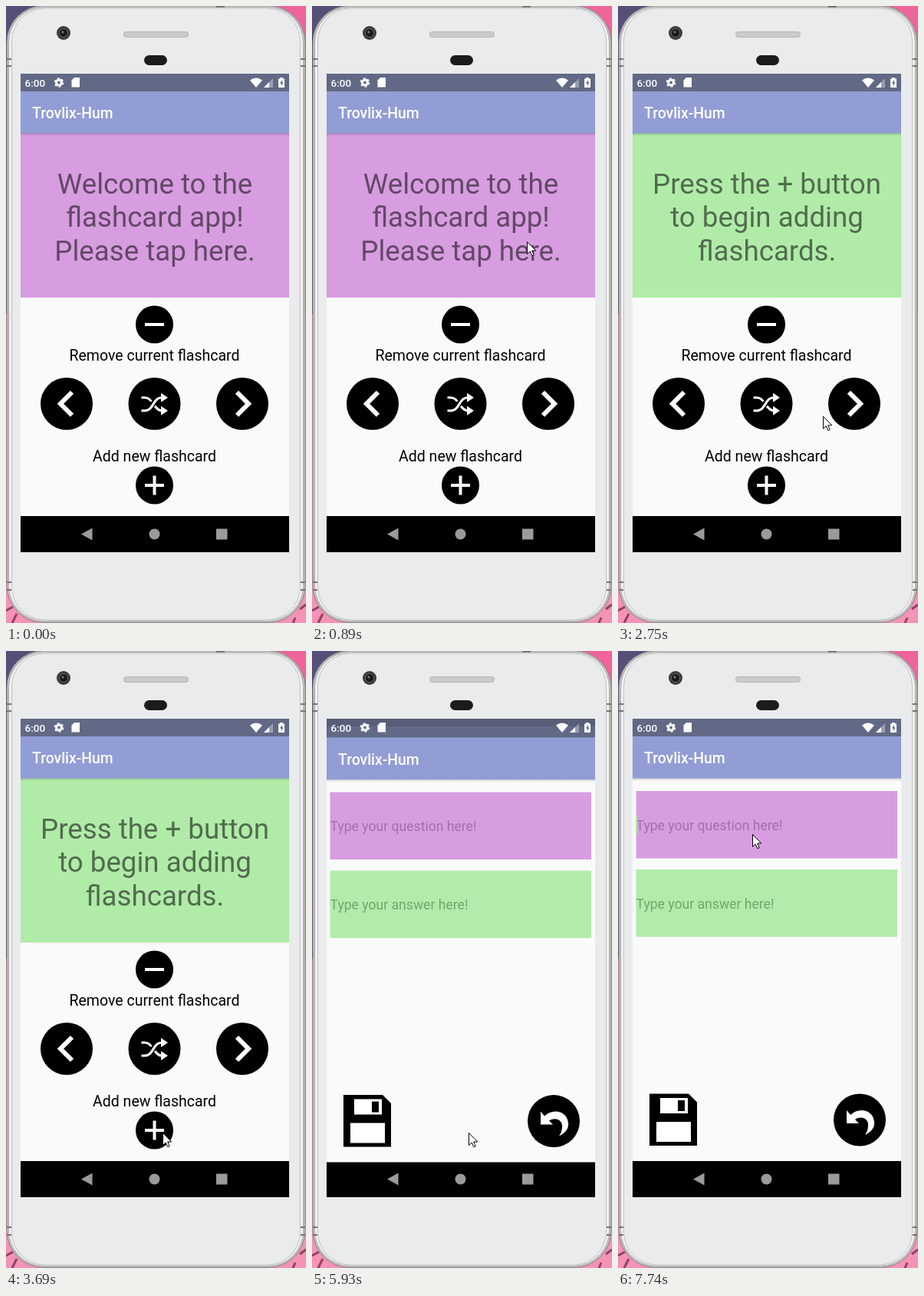
Write an HTML page that moves like this. It is 391 px wide and 802 px high and loops after 8 s.

```html
<!DOCTYPE html>
<html lang="en">
<head>
<meta charset="utf-8">
<title>Flashcards</title>
<style>
html, body { margin: 0; width: 100%; height: 100%; overflow: hidden; }
svg { display: block; width: 391px; height: 802px; font-family: Roboto, sans-serif; }
.mid { text-anchor: middle; }
.card { font-size: 36.7px; fill-opacity: .54; }
.label { font-size: 19.5px; }
.hint { font-size: 17.6px; }
.line { fill: none; stroke: #fff; }
</style>
</head>
<body>
<svg viewBox="0 0 391 802">
  <defs>
    <linearGradient id="shade" x2="0" y2="1">
      <stop stop-opacity=".2"/><stop offset="1" stop-opacity="0"/>
    </linearGradient>
    <linearGradient id="sky">
      <stop offset=".1" stop-color="#565079"/><stop offset=".6" stop-color="#f0649c"/>
    </linearGradient>
    <clipPath id="screen"><path d="M19 88h350v622H19z"/></clipPath>
    <clipPath id="reveal"><rect id="revealBox" x="19" y="88" width="350" height="622"/></clipPath>
    <g id="chrome">
      <path fill="#000" d="M19 663h350v60H19z"/>
      <path fill="#fafafa" d="M19 165h350v498H19z"/>
      <path fill="#626986" d="M19 80h350v31H19z"/>
    </g>
    <g id="bar">
      <path fill="url(#shade)" d="M19 165h350v4H19z"/>
      <path fill="#929dd5" d="M19 111h350v54.5H19z"/>
      <text x="34" y="146" font-size="19.4" font-weight="500" fill="#fff">Trovlix-Hum</text>
    </g>
  </defs>

  <!-- backdrop -->
  <path fill="url(#sky)" d="M0 0h391v400H0z"/>
  <path fill="#f493b6" d="M0 400h391v402H0z"/>
  <path fill="none" stroke="#8d4468" stroke-width="3" d="M0 786l9-5M8 802l6-12M391 778l-8 6M374 802l3-7"/>

  <!-- phone -->
  <rect x="1" y="-.5" width="389" height="802" rx="48" fill="#c5c1c2" stroke="#858182"/>
  <rect x="3.5" y="1.5" width="384" height="798" rx="46" fill="#f3f1f2" stroke="#aaa6a7"/>
  <rect x="7.5" y="3" width="376" height="795" rx="43" fill="#e9ebec" stroke="#c2bfc0"/>
  <path fill="#777374" d="M1 68h6v2H1zM1 77h6v2H1zM384 68h6v2h-6zM384 77h6v2h-6zM1 748h6v2H1zM1 758h6v2H1zM384 748h6v2h-6zM384 758h6v2h-6zM274 0h11v2h-11z"/>
  <circle cx="75" cy="35" r="9" fill="#3b3b3c"/>
  <circle cx="75" cy="35" r="5.5" fill="#171819" stroke="#666"/>
  <circle cx="74" cy="34" r="1.7" fill="#69727c"/>
  <rect x="153.5" y="33.5" width="84" height="7" rx="3" fill="#c9cacc" stroke="#b4b5b7"/>
  <rect x="180" y="64" width="30" height="13" rx="6.5" fill="#1b1b1c"/>

  <g clip-path="url(#screen)">
    <g id="home">
      <use href="#chrome"/>
      <path id="face" d="M19 165h350v214H19z"/>
      <g class="card mid" id="lines">
        <text x="194" y="244"/><text x="194" y="287"/><text x="194" y="330.5"/>
      </g>
      <use href="#bar"/>
      <circle cx="193.5" cy="414" r="24.5"/>
      <circle cx="193.5" cy="623" r="24.5"/>
      <circle cx="79" cy="517" r="34"/>
      <circle cx="193.5" cy="517" r="34"/>
      <circle cx="308" cy="517" r="34"/>
      <path class="line" stroke-width="4" d="M181 414h25M181 623h25M193.5 610.500v25"/>
      <path class="line" stroke-width="6" d="M86 502L71 517l15 15M301 502l15 15-15 15"/>
      <path class="line" stroke-width="3" d="M176.500 526h4C193 526 191 509 203 509M176.500 509h4c5 0 7 2 9 5M194 520c3 4 5 6 9 6"/>
      <path fill="#fff" d="M202 503l9 6-9 6zM202 520l9 6-9 6z"/>
      <text class="label mid" x="193.500" y="461">Remove current flashcard</text>
      <text class="label mid" x="193.500" y="592">Add new flashcard</text>
      <path id="dim" fill-opacity=".1" d="M19 80h350v650H19z"/>
    </g>

    <g clip-path="url(#reveal)">
      <g id="editor">
        <use href="#chrome"/>
        <use href="#bar"/>
        <path fill="#d79de0" d="M23.500 182H364v87.500H23.500z"/>
        <path fill="#b1ecaa" d="M23.500 284H364v87.500H23.500z"/>
        <text class="hint" x="23.500" y="232.500" fill="#a76bb0">Type your question here!</text>
        <text class="hint" x="23.500" y="334.500" fill="#74a56e">Type your answer here!</text>
        <path id="caret" fill="#aeeaa5" d="M23 214h2v24h-2z"/>
        <path d="M41 575.500h51l11 11V643H41z"/>
        <path fill="#fff" d="M55 581h36v20H55zM50 612h45v26H50z"/>
        <path d="M78 584h9v14h-9z"/>
        <circle cx="315" cy="609.500" r="34"/>
        <path fill="#fff" d="M298 597v17h16l-5-5c9-6 18 0 17 8 0 5-2 9-4 12 8-4 13-10 12-17-2-17-21-19-31-9z"/>
      </g>
    </g>

    <!-- system icons -->
    <g fill="#fff">
      <text x="24.500" y="104.500" font-size="13.500" font-weight="500">6:00</text>
      <circle cx="69" cy="99.500" r="3.400" class="line" stroke-width="3"/>
      <circle cx="69" cy="99.500" r="5.300" class="line" stroke-width="2" stroke-dasharray="2.800 2.750"/>
      <path d="M89 93h7v12.500H85.500V96.500z"/>
      <path d="M318 96.500q8-6 16 0L326 106z"/>
      <path fill-opacity=".35" d="M348 94v12h-12z"/>
      <path d="M343 99v7h-7z"/>
      <path d="M357 93h4v1.500h2V106h-8V94.500h2z"/>
      <path fill="#626986" d="M360 96l-3 4.500h1.700V104l2.800-4.500H360z"/>
    </g>
    <g fill="#9b9b9b">
      <path d="M98 686.500l14.500-8v16z"/>
      <circle cx="193.500" cy="686.500" r="7"/>
      <path d="M274 679.500h14.500v14H274z"/>
    </g>
  </g>

  <path id="cursor" fill="#fff" stroke="#000" d="M.5.5v16l3.700-3.500 2.600 5.700 2.400-1-2.500-5.700h5z"/>
</svg>
<script>
const $ = id => document.getElementById(id);
const LOOP = 8000;

// time, x, y of the pointer tip
const pointer = [
  [0, 400, 540], [500, 384, 522], [640, 352, 450], [765, 298, 345], [890, 280, 306],
  [2750, 267, 533], [2900, 255, 620], [3050, 251, 627], [3300, 246, 628],
  [3450, 236, 631], [3570, 214, 630], [3690, 204, 626],
  [6610, 217, 528], [6760, 213, 432], [6910, 193, 292], [7030, 181, 247], [7180, 175, 238]
];
// time, home shift, editor shift, top of the revealed part
const slide = [[0, 0, 0, 710], [5780, -6, 14, 178.5], [5930, -7, 1.6, 98], [6060, 0, 0, 88]];
const sides = [
  ["#d79de0", "Welcome to the", "flashcard app!", "Please tap here."],
  ["#b0eca8", "Press the + button", "to begin adding", "flashcards."]
];

const at = (steps, t) => steps.findLast(s => s[0] <= t);
const move = (id, x, y) => $(id).setAttribute("transform", `translate(${x} ${y})`);
const show = (id, on) => $(id).setAttribute("visibility", on ? "visible" : "hidden");

function draw(t) {
  const [, x, y] = at(pointer, t);
  move("cursor", x, y);

  const [color, ...words] = sides[t < 1600 ? 0 : 1];
  $("face").setAttribute("fill", color);
  words.forEach((line, i) => $("lines").children[i].textContent = line);

  const [, homeY, editorY, top] = at(slide, t);
  move("home", 0, homeY);
  move("editor", 0, editorY);
  $("revealBox").setAttribute("y", top);
  show("dim", t >= 5780);
  show("caret", t >= 7740);
}

function tick(now) {
  draw(now % LOOP);
  requestAnimationFrame(tick);
}
draw(0);
requestAnimationFrame(tick);
</script>
</body>
</html>
```
